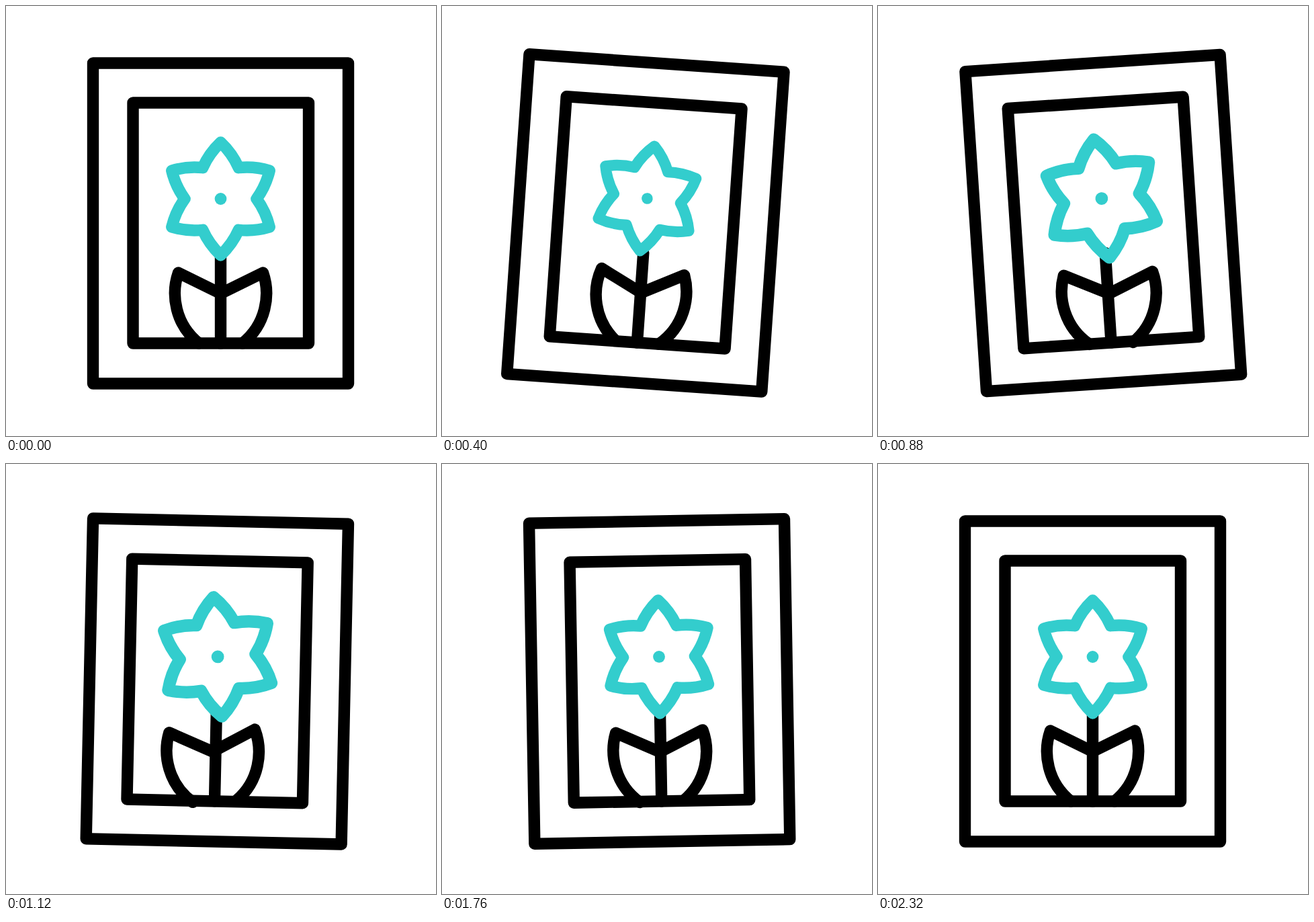
Animation of 640x640 px, one loop 2560 ms. Source, as an HTML page:

```html
<!DOCTYPE html>
<html lang="en">
<head>
<meta charset="utf-8">
<title>Swinging flower picture</title>
<style>
  html, body { margin: 0; width: 100%; height: 100%; overflow: hidden; background: #fff; }
  svg { display: block; width: 100%; height: 100%; }
</style>
</head>
<body>
<svg viewBox="0 0 640 640" fill="none" stroke="#000" stroke-width="17.4"
     stroke-linecap="round" stroke-linejoin="round">
  <g id="picture">
    <rect x="129.5" y="85" width="380" height="477"/>
    <rect x="189" y="144" width="261.5" height="358"/>
    <path d="M319.5 368V502"/>
    <path id="leftLeaf" d="M319.5 428L256.5 397C245 430 252 474 287 502"/>
    <path id="rightLeaf" d="M319.5 428L382.5 397C394 430 387 474 352 502"/>
    <g id="flower" stroke="#33cdcd">
      <path id="petals"/>
      <circle r="8.9" fill="#33cdcd" stroke="none"/>
    </g>
  </g>
</svg>
<script>
const LOOP = 2560, STEP = 40;
const CX = 319.5, HOOK = 85, HEART = 287, ROOT = 502;
const el = id => document.getElementById(id);
const picture = el('picture'), flower = el('flower');
const leftLeaf = el('leftLeaf'), rightLeaf = el('rightLeaf');

// Keys are [time, value] pairs, eased in and out between neighbours.
const swing = [[0, 0], [400, 4], [840, -4], [1200, 2], [1560, -2], [1960, 0]];
const leftSway = swing.map(([t, v]) => [t + 240, v]);
const rightSway = swing.map(([t, v]) => [Math.min(t + 380, 2320), v]);
const spin = [[160, 0], [560, 6], [1000, -6], [1360, -3.1], [1720, 0]];
const pulse = [[160, 1], [560, 0.9], [1000, 1.09], [1360, 0.966], [1720, 1]];

function valueAt(keys, t) {
  if (t <= keys[0][0]) return keys[0][1];
  for (let i = 1; i < keys.length; i++) {
    const [t0, v0] = keys[i - 1], [t1, v1] = keys[i];
    if (t < t1) {
      const p = (t - t0) / (t1 - t0);
      return v0 + (v1 - v0) * p * p * (3 - 2 * p);
    }
  }
  return keys[keys.length - 1][1];
}

function polar(r, deg) {
  const a = (deg - 90) * Math.PI / 180;
  return (r * Math.cos(a)).toFixed(2) + ' ' + (r * Math.sin(a)).toFixed(2);
}

function petalPath() {
  let d = 'M' + polar(84, 0);
  for (let a = 0; a < 360; a += 60) {
    d += 'Q' + polar(70, a + 14.2) + ' ' + polar(53.5, a + 30);
    d += 'Q' + polar(70, a + 45.8) + ' ' + polar(84, a + 60);
  }
  return d + 'Z';
}

const turn = (node, deg, y) => node.setAttribute('transform', `rotate(${deg} ${CX} ${y})`);

function draw(t) {
  turn(picture, valueAt(swing, t), HOOK);
  turn(leftLeaf, valueAt(leftSway, t), ROOT);
  turn(rightLeaf, valueAt(rightSway, t), ROOT);
  flower.setAttribute('transform',
    `translate(${CX} ${HEART}) rotate(${valueAt(spin, t)}) scale(${valueAt(pulse, t)})`);
}

el('petals').setAttribute('d', petalPath());
const start = performance.now();
function tick() {
  const t = (performance.now() - start) % LOOP;
  draw(Math.floor(t / STEP) * STEP);
  requestAnimationFrame(tick);
}
draw(0);
requestAnimationFrame(tick);
</script>
</body>
</html>
```
